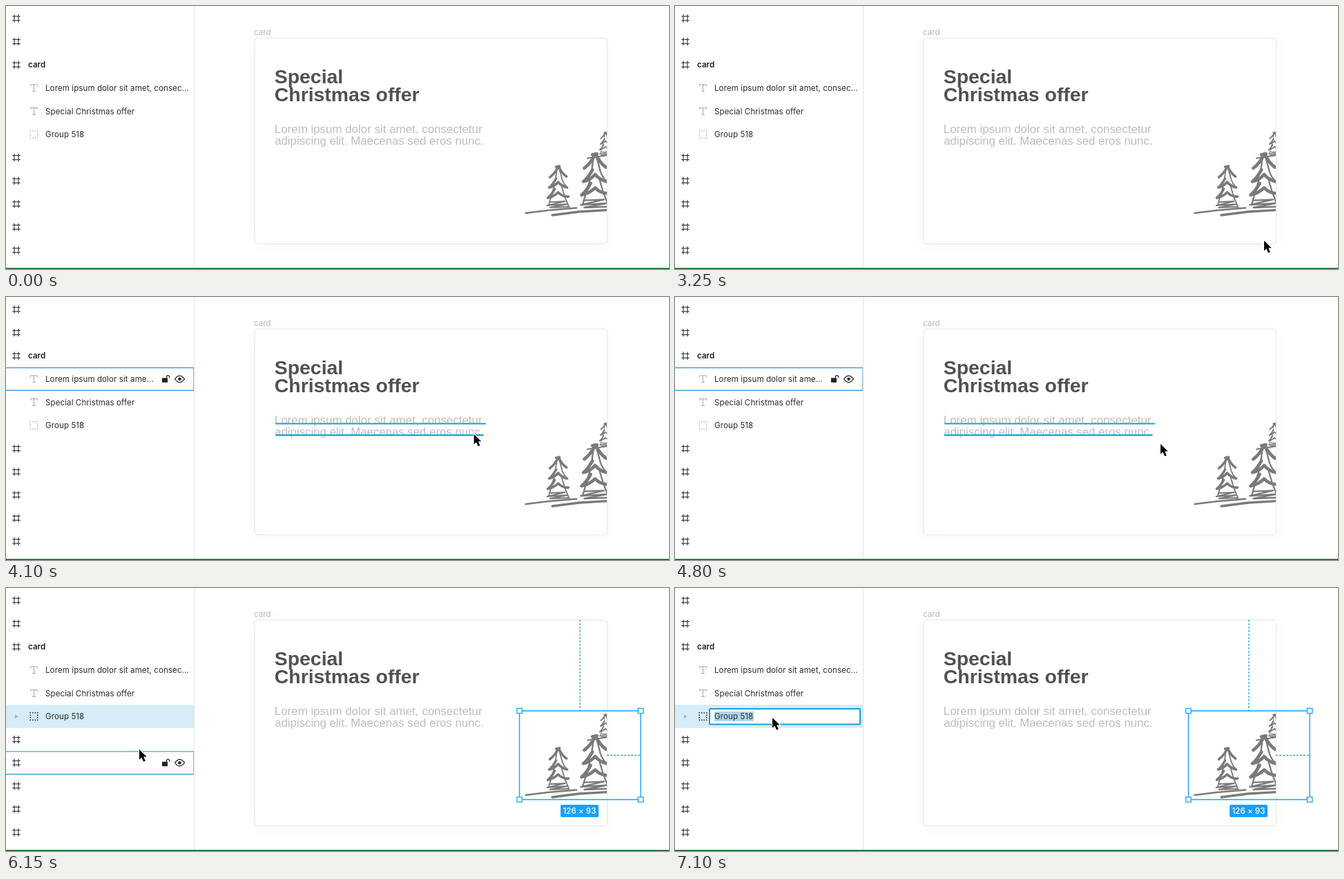
Write an HTML page with a canvas that moves like this. It is 960 px wide and 381 px high and loops after 8 s.

```html
<!DOCTYPE html>
<html lang="en">
<head>
<meta charset="utf-8">
<title>Layer selection</title>
<style>
html, body { margin: 0; width: 960px; height: 381px; overflow: hidden; background: #fff; }
canvas { display: block; }
</style>
</head>
<body>
<canvas id="stage" width="960" height="381"></canvas>
<script>
const ctx = document.getElementById('stage').getContext('2d');
const LOOP = 8000, STEP = 50;
const BLUE = '#18a0fb', HOVER = '#199fe0', INK = '#2b2b2b', TREE = '#7a7a7a';
const UI = 'Inter, sans-serif', SANS = '"Liberation Sans", Arial, sans-serif';
const rowY = i => 18 + 33.6 * i;

// time, x, y of the pointer tip
const pointerKeys = [
  [3250, 853, 340], [3350, 853, 340], [3700, 760, 213], [4200, 668, 197], [4400, 662, 194],
  [4750, 662, 194], [4800, 703, 213], [5300, 823, 266], [5850, 823, 266],
  [6150, 193, 234], [6650, 141, 188]
];
// time, hovered canvas object, hovered row
const hoverKeys = [
  [0, '', -1], [3450, 'group', 5], [3850, '', -1], [3950, 'text', 3], [4850, '', -1],
  [5000, 'group', 5], [5950, '', -1], [6050, '', 7], [6200, '', 6], [6350, '', 5]
];
const SELECT = 5550, EDIT = 6850;

const boughs = new Path2D(
  'M-3 1 L2 0 M0 1 Q-5 11-12 16 M1 1 Q5 10 12 15' +
  'M-3 18 Q-8 27-13 31 Q-5 29 0 23 Q5 29 13 31' +
  'M-5 33 Q-9 41-15 46 Q-6 44 0 38 Q7 45 15 44');
const twigs = new Path2D(
  'M-2 5 L-4 21 M2 5 L6 20 Q8 26 13 31 M-6 30 L-14 57 M5 29 Q9 45 16 60' +
  'M-12 52 L10 51 L-16 57 L14 55 L-12 60 L14 59');
const arrow = new Path2D('M0 0V14.8L3.4 11.6L6 17.6L8.8 16.4L6.2 10.6H10.7Z');
const openLock = new Path2D('M-5-1.5H3V5H-5Z');

function line(points, color, width = 1) {
  ctx.beginPath();
  points.forEach(([x, y], i) => i ? ctx.lineTo(x, y) : ctx.moveTo(x, y));
  ctx.strokeStyle = color;
  ctx.lineWidth = width;
  ctx.stroke();
}

function box(x, y, w, h, { fill, stroke, width = 1, r = 0 }) {
  ctx.beginPath();
  ctx.roundRect(x, y, w, h, r);
  if (fill) { ctx.fillStyle = fill; ctx.fill(); }
  if (stroke) { ctx.strokeStyle = stroke; ctx.lineWidth = width; ctx.stroke(); }
}

function text(s, x, y, font, color, spacing = 0) {
  ctx.font = font;
  ctx.letterSpacing = spacing + 'px';
  ctx.fillStyle = color;
  ctx.fillText(s, x, y);
}

function at(x, y, draw, scale = 1) {
  ctx.save();
  ctx.translate(x, y);
  ctx.scale(scale, scale);
  draw();
  ctx.restore();
}

const frameIcon = y => at(15, y, () => {
  for (const d of [-3, 3]) {
    line([[d, -5.7], [d, 5.7]], INK, 1.1);
    line([[-5.7, d], [5.7, d]], INK, 1.1);
  }
});

const textIcon = y => at(40.5, y, () => {
  line([[-5, -2.5], [-5, -5], [5, -5], [5, -2.5]], '#a8a8a8');
  line([[0, -5], [0, 5]], '#a8a8a8');
  line([[-2.5, 5], [2.5, 5]], '#a8a8a8');
});

function groupIcon(y, color) {
  ctx.fillStyle = color;
  for (let i = 0; i < 4; i++)
    for (let j = 0; j < 4; j++)
      if (i % 3 === 0 || j % 3 === 0) ctx.fillRect(34.5 + i * 3.5, y - 6 + j * 3.5, 1.5, 1.5);
}

function rowTools(y) {
  at(231, y, () => {
    ctx.fillStyle = '#222';
    ctx.fill(openLock);
    ctx.beginPath();
    ctx.moveTo(1.5, -1);
    ctx.lineTo(1.5, -3);
    ctx.arc(3.6, -3, 2.1, Math.PI, 0);
    ctx.lineTo(5.7, -1.5);
    ctx.strokeStyle = '#222';
    ctx.lineWidth = 1.2;
    ctx.stroke();
  });
  at(251.5, y, () => {
    ctx.beginPath();
    ctx.moveTo(-7, 0);
    ctx.quadraticCurveTo(0, -9.5, 7, 0);
    ctx.quadraticCurveTo(0, 9.5, -7, 0);
    ctx.strokeStyle = '#222';
    ctx.lineWidth = 1.2;
    ctx.stroke();
    ctx.beginPath();
    ctx.arc(0, 0, 2.3, 0, 7);
    ctx.fillStyle = '#222';
    ctx.fill();
  });
}

function sidebar(row, selected, editing) {
  const groupY = rowY(5);
  if (selected) {
    box(0, groupY - 16.8, 272, 33.6, { fill: '#d6ecf8' });
    ctx.fillStyle = '#a3b3bc';
    ctx.fill(new Path2D(`M13 ${groupY - 3}l4.5 3l-4.5 3Z`));
  }
  for (let i = 0; i < 11; i++) if (i < 3 || i > 5) frameIcon(rowY(i));
  textIcon(rowY(3));
  textIcon(rowY(4));
  groupIcon(groupY, selected ? '#222' : '#b4b4b4');

  if (editing) {
    box(50, 175, 218, 22.5, { fill: '#fff', stroke: HOVER, width: 2, r: 1 });
    box(57, 179, 57, 14, { fill: '#b3d4ea' });
  }
  const label = (s, i) => text(s, 57, rowY(i) + 4.2, '11.55px ' + UI, INK, .09);
  text('card', 32, rowY(2) + 4.2, '600 11.55px ' + UI, '#1c1c1c', .05);
  label(row === 3 ? 'Lorem ipsum dolor sit ame...' : 'Lorem ipsum dolor sit amet, consec...', 3);
  label('Special Christmas offer', 4);
  label('Group 518', 5);

  if (row >= 0 && !editing) {
    rowTools(rowY(row));
    if (!(selected && row === 5))
      box(-1, rowY(row) - 16.3, 273, 32.8, { stroke: '#45a2d9', width: 1.4 });
  }
  line([[272.5, 0], [272.5, 380]], '#e3e3e3');
}

function trees() {
  ctx.save();
  ctx.beginPath();
  ctx.rect(740, 170, 130, 140);
  ctx.clip();
  ctx.lineCap = ctx.lineJoin = 'round';
  ctx.strokeStyle = TREE;
  for (const [x, y, scale] of [[799.5, 232, 1], [853, 214, 1.3], [868, 183, .55]])
    at(x, y, () => {
      ctx.lineWidth = 3.6;
      ctx.stroke(boughs);
      ctx.lineWidth = 1.8;
      ctx.stroke(twigs);
    }, scale);
  line([[752.5, 300], [785, 296], [826, 292.5]], TREE, 2.6);
  line([[791, 303], [830, 298], [872, 295.5]], TREE, 3.4);
  line([[842, 220.5], [872, 216]], TREE, 2);
  ctx.restore();
}

function card() {
  ctx.save();
  ctx.shadowColor = 'rgba(0,0,0,.035)';
  ctx.shadowBlur = 22;
  ctx.shadowOffsetY = 3;
  box(360, 46.5, 510.5, 298, { fill: '#fff', r: 4 });
  ctx.restore();
  box(360, 46.5, 510.5, 298, { stroke: '#e6e6e6', r: 4 });
  text('card', 359, 41.8, '11.55px ' + UI, '#b8b8b8', .05);
  const title = 'bold 28.4px ' + SANS, body = '16.8px ' + SANS;
  text('Special', 388.8, 111.6, title, '#515153');
  text('Christmas offer', 388.8, 137.9, title, '#515153');
  text('Lorem ipsum dolor sit amet, consectetur', 388.8, 184, body, '#bdbdbd', .06);
  text('adipiscing elit. Maecenas sed eros nunc.', 389.2, 200.6, body, '#bdbdbd');
  trees();
}

function selection() {
  ctx.setLineDash([3, 2]);
  line([[831, 46], [831, 178]], BLUE, 1.3);
  line([[870, 242.3], [919, 242.3]], BLUE, 1.3);
  ctx.setLineDash([]);
  box(743.5, 178, 175.5, 128.5, { stroke: BLUE, width: 1.4 });
  for (const x of [743.5, 919])
    for (const y of [178, 306.5])
      box(x - 3.7, y - 3.7, 7.4, 7.4, { fill: '#fff', stroke: BLUE, width: 1.3 });
  box(803, 314, 55, 18, { fill: BLUE, r: 2 });
  ctx.textAlign = 'center';
  text('126 × 93', 830.5, 327.2, '500 11.55px ' + UI, '#fff', .05);
  ctx.textAlign = 'left';
}

function pointer(t) {
  if (t < pointerKeys[0][0]) return;
  const n = pointerKeys.findIndex(k => k[0] > t);
  const b = pointerKeys.at(n), a = n < 0 ? b : pointerKeys[n - 1];
  const p = a === b ? 0 : (t - a[0]) / (b[0] - a[0]);
  const e = p * p * (3 - 2 * p);
  at(a[1] + (b[1] - a[1]) * e, a[2] + (b[2] - a[2]) * e, () => {
    ctx.strokeStyle = '#fff';
    ctx.lineWidth = 2;
    ctx.stroke(arrow);
    ctx.fillStyle = '#000';
    ctx.fill(arrow);
  });
}

function draw(t) {
  const [, hovered, row] = hoverKeys.findLast(k => k[0] <= t);
  const selected = t >= SELECT;
  box(0, 0, 960, 381, { fill: '#fff' });
  card();
  sidebar(row, selected, t >= EDIT);
  if (selected) selection();
  else if (hovered === 'group') box(743.5, 178, 175.5, 129, { stroke: HOVER, width: 2.2 });
  if (hovered === 'text') {
    line([[390, 183.5], [695, 183.5]], HOVER, 2.2);
    line([[390, 200.2], [691.5, 200.2]], HOVER, 2.2);
  }
  pointer(t);
  box(0, 379.6, 960, 1.4, { fill: '#0b5a12' });
}

function tick() {
  const t = performance.now() % LOOP;
  draw(Math.floor(t / STEP) * STEP);
  requestAnimationFrame(tick);
}
tick();
</script>
</body>
</html>
```
